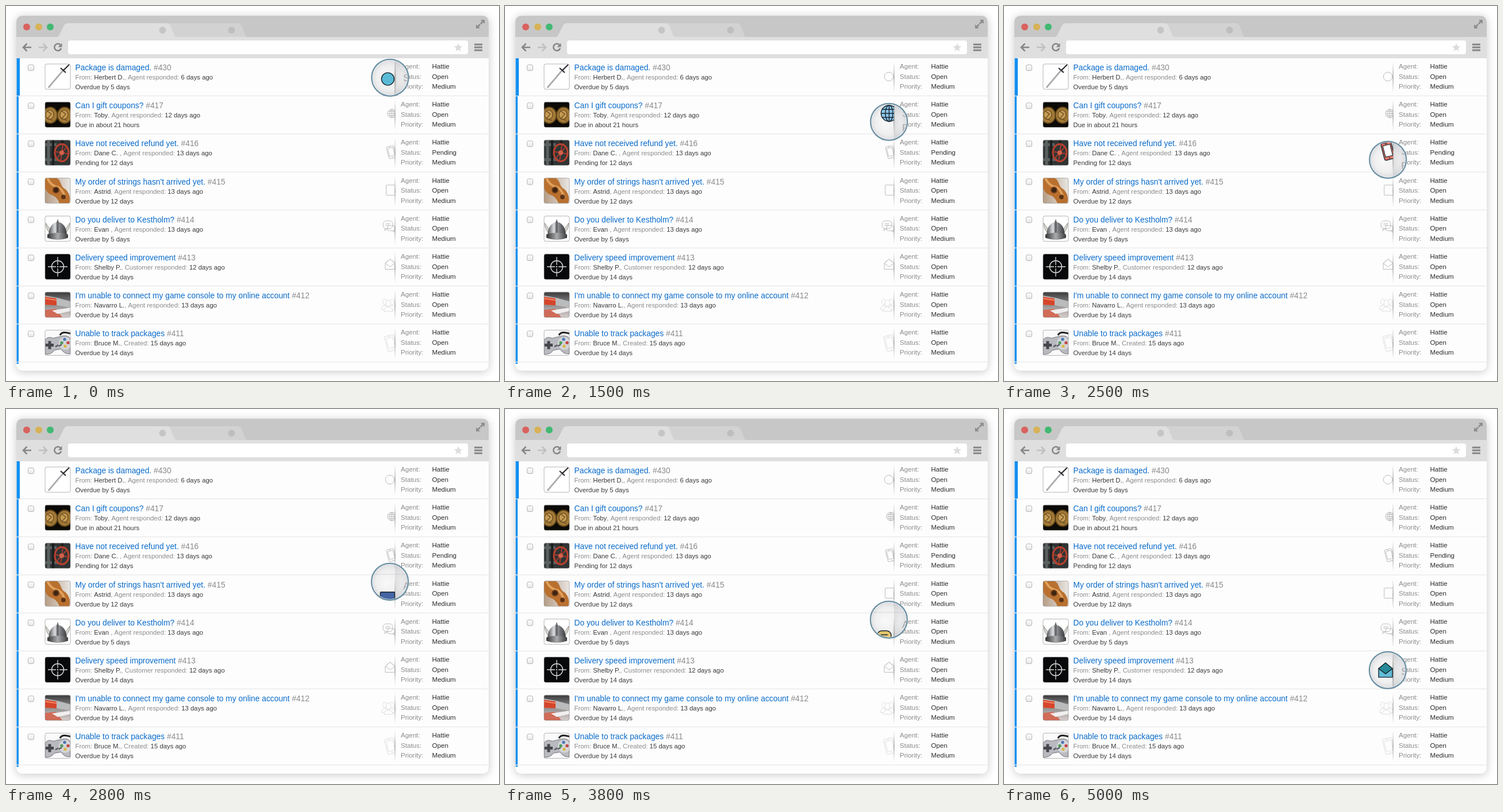
Write an HTML page with a canvas that moves like this. It is 858x653 px and loops after 5500 ms.

```html
<!DOCTYPE html>
<html lang="en">
<head>
<meta charset="utf-8">
<title>Ticket list with magnifier</title>
<style>
html, body { margin: 0; width: 100%; height: 100%; overflow: hidden; background: #fff; }
canvas { display: block; }
</style>
</head>
<body>
<canvas width="858" height="653"></canvas>
<script>
const ctx = document.querySelector('canvas').getContext('2d');
const ROW = 66.2, ZOOM = 1.42, EDGE = 677;
const BLUE = '#0a6ccb', GREY = '#8b8b8b', DARK = '#3a3a3a';

const tickets = [
  ['Package is damaged.', 430, 'Herbert D.', ', Agent responded: ', '6 days ago', 'Overdue by 5 days'],
  ['Can I gift coupons?', 417, 'Toby', ', Agent responded: ', '12 days ago', 'Due in about 21 hours'],
  ['Have not received refund yet.', 416, 'Dane C. ', ', Agent responded: ', '13 days ago', 'Pending for 12 days', 'Pending'],
  ["My order of strings hasn't arrived yet.", 415, 'Astrid', ', Agent responded: ', '13 days ago', 'Overdue by 12 days'],
  ['Do you deliver to Kestholm?', 414, 'Evan ', ', Agent responded: ', '13 days ago', 'Overdue by 5 days'],
  ['Delivery speed improvement', 413, 'Shelby P.', ', Customer responded: ', '12 days ago', 'Overdue by 14 days'],
  ["I'm unable to connect my game console to my online account", 412, 'Navarro L.', ', Agent responded: ', '13 days ago', 'Overdue by 14 days'],
  ['Unable to track packages', 411, 'Bruce M.', ', Created: ', '15 days ago', 'Overdue by 14 days']
];

function shape(d, fill, stroke, width = 1) {
  const path = new Path2D(d);
  if (fill) { ctx.fillStyle = fill; ctx.fill(path); }
  if (stroke) { ctx.strokeStyle = stroke; ctx.lineWidth = width; ctx.stroke(path); }
}

function disc(x, y, rx, fill, stroke, width = 1, ry = rx) {
  ctx.beginPath();
  ctx.ellipse(x, y, rx, ry, 0, 0, 7);
  if (fill) { ctx.fillStyle = fill; ctx.fill(); }
  if (stroke) { ctx.strokeStyle = stroke; ctx.lineWidth = width; ctx.stroke(); }
}

function box(x, y, w, h, r, fill, stroke, width = 1) {
  ctx.beginPath();
  ctx.roundRect(x, y, w, h, r);
  if (fill) { ctx.fillStyle = fill; ctx.fill(); }
  if (stroke) { ctx.strokeStyle = stroke; ctx.lineWidth = width; ctx.stroke(); }
}

// Draws runs of [text, colour] one after another on a baseline.
function write(x, y, size, ...runs) {
  ctx.font = size + 'px "Liberation Sans", Arial, sans-serif';
  for (const [text, color] of runs) {
    ctx.fillStyle = color;
    ctx.fillText(text, x, y);
    x += ctx.measureText(text).width;
  }
}

function scoped(draw) {
  ctx.save();
  draw();
  ctx.restore();
}

function fade(x0, y0, x1, y1, ...colors) {
  const g = ctx.createLinearGradient(x0, y0, x1, y1);
  colors.forEach((c, i) => g.addColorStop(i / (colors.length - 1), c));
  return g;
}

// Thumbnails in a 44 by 44 box.
const thumbs = [
  () => {
    shape('M0 0H44V44H0Z', '#fff');
    shape('M6 41L33 9', null, '#8d8d92', 2.6);
    shape('M7 40L31 11', null, '#d5d5d8', .9);
    shape('M27 7L36 15M32 11L42 1', null, '#2d2d33', 2.2);
  },
  () => {
    shape('M0 0H44V44H0Z', '#0c0a07');
    for (const x of [9, 34]) {
      disc(x, 23, 12.5, '#a27a37', '#5f4318', 2, 14);
      disc(x - 1, 22, 7, '#c59c52', '#735325', 1.5, 8);
      shape(`M${x - 6} 15l8 6-7 8 10 3`, null, '#76552a', 1.5);
    }
  },
  () => {
    shape('M0 0H44V44H0Z', '#303434');
    shape('M0 8H20M6 0V44M0 34H24', null, '#5a605f', 5);
    shape('M14 0V44M30 0V8', null, '#1c1f1f', 4);
    disc(29, 22, 12, null, '#b9412e', 3, 15);
    shape('M17 20L41 24M27 37L31 8M20 32L38 12', null, '#a53a2b', 2);
    disc(29, 22, 4, '#d2614a');
  },
  () => {
    shape('M0 0H44V44H0Z', fade(0, 0, 44, 0, '#b59c85', '#e9e6e2'));
    shape('M0 0H20C30 6 25 14 36 20Q46 30 42 44H25Q20 31 10 29Q0 24 0 14Z', '#b9702f');
    shape('M4 0Q10 13 20 15T35 34', null, '#e0a25c', 4);
    disc(19, 21, 5, '#3c2413', '#7a431b', 2);
    disc(32, 33, 4, '#5b3216');
  },
  () => {
    shape('M0 0H44V44H0Z', '#fff');
    shape('M1 12Q2 27 10 29L8 22ZM43 12Q42 27 34 29L36 22Z', '#d8d6d0', '#85827d', .8);
    shape('M6 33Q7 13 22 10Q37 13 38 33Z', fade(6, 0, 38, 0, '#4b4c4f', '#d9dadd', '#77787b', '#3c3d40'));
    shape('M20 11L22 5L24 11V32H20Z', '#696b6e');
    shape('M4 32Q22 26 40 32V38Q22 45 4 38Z', fade(4, 0, 40, 0, '#333', '#a9abad', '#3b3b3d'));
  },
  () => {
    shape('M0 0H44V44H0Z', '#08090a');
    disc(22, 22, 10.5, null, '#d8dada', 1.4);
    shape('M22 5V19M22 25V39M5 22H19M25 22H39', null, '#d8dada', 1.3);
    disc(22, 22, 1.2, '#d8dada');
  },
  () => {
    shape('M0 0H44V44H0Z', fade(0, 0, 0, 44, '#3b3b3d', '#8f8d8d', '#d8cfcd'));
    shape('M0 6L22 10L44 16V27L20 23L0 22Z', '#b9bbbc');
    shape('M0 8L20 11V23L0 22Z', '#d6452b');
    shape('M0 11L20 14', null, '#f08767', 2);
    shape('M0 31L19 29L30 44H0Z', '#d06b58');
    shape('M12 32L44 27V33L22 38Z', '#f0eeee');
  },
  () => {
    shape('M0 0H44V44H0Z', '#fafafa');
    shape('M26 9Q29 1 44 6', null, '#242426', 3);
    shape('M0 17Q5 10 14 14L32 10Q44 9 44 18V41Q34 43 28 33L16 35Q11 43 0 42Z', '#b9bac0', '#77787e');
    disc(35, 23, 11, '#d4d5d9');
    shape('M8 19V33M1 26H15', null, '#46464c', 5);
    shape('M18 29l5-3M24 28l5-3', null, '#5c5c64', 2.4);
    disc(34, 16, 2.7, '#4c78b8');
    disc(29, 22, 2.7, '#4d9b5b');
    disc(40, 22, 2.7, '#c54747');
    disc(35, 28, 2.7, '#d8ba48');
  }
];

function phone(fill, ink, width) {
  ctx.rotate(-.25);
  box(-9, -15, 18, 30, 3, fill, ink, width);
  box(-6.5, -10.5, 13, 20, 0, '#fdfdfd', ink, width * .8);
  shape('M-2 -12.8H2M-1 12.4H1', null, ink, width);
}

function bubble(x, y, rx, ry, fill, ink, width) {
  box(x - rx, y - ry, 2 * rx, 2 * ry, ry * .8, fill, ink, width);
}

// Channel icons around their own centre, at magnified size.
const icons = [
  { x: 668, y: 123, lensX: 664.5, lensDy: 2, fill: '#5bbbd6',
    draw: (fill, ink, w) => disc(0, 0, 11, fill, ink, w) },
  { x: 671.5, y: 121, lensX: 668.5, lensDy: .5, size: .53, fill: '#8cc4ea',
    draw(fill, ink, w) {
      disc(0, 0, 14, fill, ink, w);
      disc(0, 0, 6.5, null, ink, w, 14);
      shape('M0 -14V14M-14 0H14M-12 -7H12M-12 7H12', null, ink, w);
    } },
  { x: 670.5, y: 122, lensX: 668, lensDy: 0, fill: '#ee7a6d', draw: phone },
  { x: 670.5, y: 122, lensX: 664, lensDy: -1, fill: '#4564a4',
    draw: (fill, ink, w) => box(-12.5, -12.5, 25, 25, 1, fill, ink, w) },
  { x: 666, y: 118.5, lensX: 662, lensDy: 1, fill: '#e3c46d',
    draw(fill, ink, w) {
      bubble(6, 5, 9, 6.5, fill, ink, w);
      shape('M9 11L14 15L13 10', fill, ink, w);
      bubble(-2, -3.5, 12, 9.5, fill, ink, w);
      shape('M-8 5L-10 11L-2 6', fill, ink, w);
      shape('M-8 -6H4M-8 -2H2', null, ink, w);
    } },
  { x: 668.5, y: 119, lensX: 664, lensDy: 0, fill: '#63bcd8',
    draw(fill, ink, w) {
      shape('M-12 -3L0 -13L12 -3V12H-12Z', fill, ink, w);
      shape('M-12 -3L0 -13L12 -3L0 6Z', fill && '#258a96', ink, w);
    } },
  { x: 665.5, y: 123, lensX: 661, lensDy: 0, fill: null, pale: true,
    draw(fill, ink, w) {
      for (const x of [-9, 9]) {
        disc(x, -7, 5, fill, ink, w, 7);
        shape(`M${x - 8} 12Q${x - 8} 3 ${x} 2Q${x + 8} 3 ${x + 8} 12Z`, fill, ink, w);
      }
      disc(0, -4, 6, '#fdfdfd', ink, w, 8);
      shape('M-11 16Q-10 7 0 5Q10 7 11 16Z', '#fdfdfd', ink, w);
    } },
  { x: 669.5, y: 123.5, lensX: 666, lensDy: 0, fill: null, size: .9, pale: true, draw: phone }
];

const labels = [['Agent:', 109], ['Status:', 126.5], ['Priority:', 144]];

function divider(y) {
  ctx.fillStyle = fade(0, y, 0, y + 54, 'rgba(150,150,150,0)', 'rgba(150,150,150,.85)', 'rgba(150,150,150,0)');
  ctx.fillRect(EDGE - .7, y, 1.5, 54);
}

function clipLeft() {
  ctx.beginPath();
  ctx.rect(0, 0, EDGE, 653);
  ctx.clip();
}

function chrome() {
  scoped(() => {
    ctx.shadowColor = 'rgba(0,0,0,.22)';
    ctx.shadowBlur = 16;
    ctx.shadowOffsetY = 2;
    box(18, 17, 822, 618, 10, '#fdfdfd');
  });
  box(18, 17, 822, 38, [10, 10, 0, 0], '#c7c7c7');
  shape('M280 30H403Q408 30 410 35L418 54H280Z', '#d2d2d2');
  shape('M89 54Q92 53 94 48L101 34Q103 30 108 30H279Q284 30 286 34L292 49Q293 53 297 54Z', '#dfdfdf');
  ctx.fillStyle = '#dfdfdf';
  ctx.fillRect(18, 54, 822, 37);
  disc(36, 36.5, 6, '#d9625f');
  disc(57, 36.5, 6, '#d7b256');
  disc(77, 36.5, 6, '#41b973');
  disc(272.5, 42, 6, '#c5c5c5');
  disc(392.5, 42, 6, '#bebebe');
  shape('M833 24v7l-2.5-2.5-3.5 3.5-2-2 3.5-3.5-2.5-2.5zM818 39v-7l2.5 2.5 3.5-3.5 2 2-3.5 3.5 2.5 2.5z', '#8c8c8c');
  shape('M44 72H31M36.5 65.5L30 72L36.5 78.5', null, '#868686', 2.6);
  shape('M57 72H70M64.500 65.5L71 72L64.5 78.5', null, '#c0c0c0', 2.6);
  shape('M94.500 67.500A6 6 0 1 0 96 73.500', null, '#868686', 2.6);
  shape('M97.500 64.500V71.500H90.500Z', '#868686');
  box(108, 60, 696, 24, 4, '#fff');
  shape('M787 64.500l2 5.200 5.500.3-4.300 3.500 1.500 5.400-4.700-3-4.700 3 1.500-5.400-4.300-3.500 5.500-.3z', '#dcdcdc');
  shape('M815 67H829M815 72H829M815 77H829', null, '#868686', 2.8);
}

function ticket([title, id, from, action, when, due, status = 'Open'], i) {
  ctx.fillStyle = '#128fef';
  ctx.fillRect(18.5, 91, i ? 3.5 : 5.5, 65);
  ctx.fillStyle = '#e4e4e4';
  ctx.fillRect(18, 156, 822, 1);
  box(38.5, 102.5, 10, 10, 2.5, fade(0, 102, 0, 113, '#fff', '#e6e6e6'), '#b4b4b4');
  scoped(() => {
    ctx.translate(68, 101);
    box(0, 0, 44, 44, 3);
    ctx.clip();
    thumbs[i]();
  });
  box(68, 101, 44, 44, 3, null, 'rgba(120,120,120,.55)');

  write(120.5, 112, 13.8, [title, BLUE], [' #' + id, GREY]);
  write(120.5, 128, 11.35, ['From: ', GREY], [from, DARK], [action, GREY], [when, DARK]);
  write(120.5, 145, 11.35, [due, DARK]);

  scoped(() => {
    const { x, y, size = 1 / ZOOM, pale, draw } = icons[i];
    clipLeft();
    ctx.translate(x, y);
    ctx.scale(size, size);
    draw(null, pale ? '#dedede' : '#bcbcbc', 1 / size);
  });
  divider(97);
  labels.forEach(([name, y], k) => {
    write(687, y, 11.6, [name, GREY]);
    write(741.5, y, 11.6, [['Hattie', status, 'Medium'][k], '#2b2b2b']);
  });
}

function lens(x, y) {
  const zoomY = v => y + ZOOM * (v - y) + 4;
  scoped(() => {
    ctx.beginPath();
    ctx.arc(x, y, 32, 0, 7);
    ctx.clip();
    const glass = ctx.createRadialGradient(x - 7, y + 2, 3, x, y, 33);
    glass.addColorStop(0, '#f7f7f7');
    glass.addColorStop(.6, '#efeff0');
    glass.addColorStop(1, '#d9dadd');
    ctx.fillStyle = glass;
    ctx.fillRect(x - 33, y - 33, 66, 66);
    ctx.fillStyle = fade(EDGE, 0, EDGE + 14, 0, 'rgba(120,120,125,.16)', 'rgba(120,120,125,0)');
    ctx.fillRect(EDGE, y - 33, 14, 66);

    scoped(() => {
      ctx.translate(EDGE * (1 - ZOOM), zoomY(0));
      ctx.scale(ZOOM, ZOOM);
      for (let i = 0; i < 8; i++) {
        ctx.fillStyle = 'rgba(150,150,150,.2)';
        ctx.fillRect(630, 156, 80, 1);
        divider(97);
        for (const [name, base] of labels) write(687, base, 11.6, [name, '#a3a3a6']);
        ctx.translate(0, ROW);
      }
    });

    clipLeft();
    icons.slice(0, 6).forEach(({ lensX, lensDy, fill, draw }, i) => scoped(() => {
      ctx.translate(lensX, y + ZOOM * (125 + 66 * i - y) + lensDy);
      draw(fill, '#17242b', 1.4);
    }));
  });
  disc(x, y, 30.7, null, 'rgba(255,255,255,.75)', 1.2);
  disc(x, y, 32, null, '#6c90a3', 2.3);
}

function render(step) {
  ctx.fillStyle = '#fff';
  ctx.fillRect(0, 0, 858, 653);
  chrome();
  tickets.forEach((row, i) => scoped(() => {
    ctx.translate(0, ROW * i);
    ticket(row, i);
  }));
  ctx.fillStyle = '#128fef';
  ctx.fillRect(18.5, 620.5, 3.5, 2.5);
  lens(668.4 - .02 * step, 124.8 + 11 * step);
}

const start = performance.now();
let shown = -1;

// Each second: half a second of rest, then six 11 px hops to the next row.
function tick() {
  const t = (performance.now() - start) % 5500;
  const hops = Math.max(0, Math.floor((t % 1000 - 400) / 100));
  const step = 6 * Math.floor(t / 1000) + hops;
  if (step !== shown) render(shown = step);
  requestAnimationFrame(tick);
}
tick();
</script>
</body>
</html>
```
